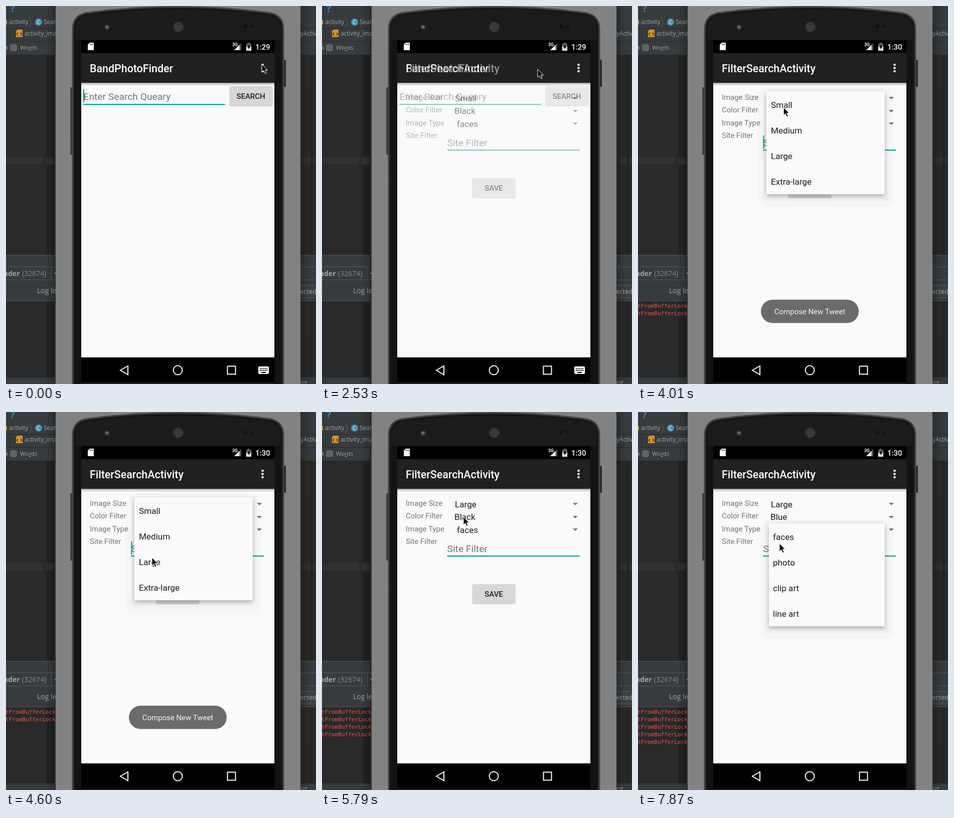
An HTML page that plays this animation: 618x753 px, repeating every 8 s.

```html
<!DOCTYPE html>
<html lang="en">
<head>
<meta charset="utf-8">
<title>Search filter demo</title>
<style>
  html, body { margin: 0; width: 100%; height: 100%; overflow: hidden; background: #2b2b2b; }
  svg { display: block; width: 618px; height: 753px; }
  text { font-family: Roboto, sans-serif; white-space: pre; }
  .ide text { font-family: "Open Sans", sans-serif; fill: #a3a5a6; font-size: 11.8px; }
  .ide .big { font-size: 14px; }
  .ide .log text { font: 11.05px "DejaVu Sans Mono", monospace; fill: #e5544f; }
  .title { font-size: 21.4px; font-weight: 500; fill: #fff; }
  .label { font-size: 14.97px; fill: #757575; }
  .hint { font-size: 19.24px; fill: #757575; }
  .item { font-size: 17.1px; fill: #1c1c1c; }
  .btn { font-size: 14.97px; font-weight: 500; fill: #1c1c1c; text-anchor: middle; }
  .raised { fill: #d6d7d7; filter: drop-shadow(0 1px 1px rgba(0,0,0,.3)); }
  .sheet { fill: #fafafa; filter: drop-shadow(0 4px 4px rgba(0,0,0,.27)); }
  .teal { fill: #009688; }
</style>
</head>
<body>
<svg viewBox="0 0 618 753">
  <defs>
    <linearGradient id="shade" x2="0" y2="1">
      <stop stop-opacity=".32"/><stop offset="1" stop-opacity="0"/>
    </linearGradient>
    <linearGradient id="edge">
      <stop stop-opacity="0"/><stop offset="1" stop-opacity=".25"/>
    </linearGradient>
    <linearGradient id="side">
      <stop stop-color="#4a4a4a"/><stop offset="1" stop-color="#222"/>
    </linearGradient>
    <pattern id="mesh" width="3" height="3" patternUnits="userSpaceOnUse">
      <rect width="3" height="3" fill="#1c1c1c"/><circle cx="1.5" cy="1.5" r="1" fill="#737373"/>
    </pattern>
    <pattern id="grain" width="4" height="4" patternUnits="userSpaceOnUse">
      <rect width="4" height="4" fill="#161616"/><path d="M0 0h2v2h-2zM2 2h2v2h-2z" fill="#101010"/>
    </pattern>
  </defs>

  <g class="ide">
    <rect width="618" height="753" fill="#2a2a2a"/>
    <rect width="618" height="97" fill="#383b3d"/>
    <path d="M0 44.5H618M0 70.5H618M0 97.5H618" stroke="#27292a"/>
    <path d="M80 98h16v399h-16zM80 588h16v152h-16zM606 98h6v399h-6zM606 588h6v152h-6z" fill="#232323"/>
    <path d="M0 301h74v15H0zM80 301h15v15H80zM590 301h17v15H590zM612 301h6v15H612z" fill="#323232"/>
    <path d="M97.5 98V497M97.5 588V740" stroke="#3b3d3e" stroke-width="2"/>
    <rect y="497" width="618" height="91" fill="#383b3d"/>
    <path d="M0 496.5H618M0 519.5H618M0 545.5H618M0 587.5H618M90.5 520V545" stroke="#56595a"/>
    <path d="M0 588.5H618" stroke="#222"/>
    <rect y="740" width="618" height="13" fill="#383b3d"/>
    <text x="9" y="12" style="font-size:18px;font-weight:700;fill:#3a8dbb">?</text>
    <rect y="28" width="2" height="9" fill="#c98a2c"/>
    <text x="6" y="36">activity</text>
    <path d="M46 22L51 32L46 43" fill="none" stroke="#5b5e60"/>
    <circle cx="65" cy="32" r="7" fill="#4b93b5"/>
    <text x="61.2" y="36" style="font-size:10.5px;fill:#e6eef2">C</text>
    <text x="75" y="36">SearchActivity</text>
    <path d="M7.5 45V70" stroke="#27292a"/>
    <path d="M23 47H33V62H20V50Z" fill="#d4932e"/>
    <path d="M24 53L21.5 56L24 59M29 53L31.5 56L29 59" fill="none" stroke="#3a2c12" stroke-width="1.3"/>
    <text x="37" y="59">activity_image</text>
    <text x="-2" y="87">x</text>
    <rect x="9" y="77" width="12" height="12" rx="2" fill="#5e6163" stroke="#77797a"/>
    <text x="28" y="87" style="font-size:11.5px">Wo<tspan text-decoration="underline">r</tspan>ds</text>
    <text class="big" x="27.5" y="538" text-anchor="end" font-weight="700">nder</text>
    <text class="big" x="32" y="538" style="fill:#858788">(32674)</text>
    <path d="M96 531h6l-3 4z" fill="#a3a5a6"/>
    <text class="big" x="62" y="572">Log level</text>
    <text x="587" y="59">yActivity</text>
    <rect x="570" y="556.500" width="60" height="25" fill="#3d4042" stroke="#5a5d5f"/>
    <text x="586" y="573" style="font-size:13px">ected</text>
    <text x="587" y="754">og</text>
    <g class="log" id="log"></g>
    <rect x="79" width="20" height="753" fill="url(#edge)"/>
    <rect x="-607" width="20" height="753" fill="url(#edge)" transform="scale(-1 1)"/>
  </g>

  <rect x="99" width="488" height="753" fill="#828282"/>
  <rect x="128" y="162" width="6" height="134" rx="1" fill="url(#side)"/>
  <rect x="552" y="107" width="6" height="54" rx="1" fill="#292929"/>
  <path d="M133 760V46Q133 20 158 14Q250 1.500 343 1.500T528 14Q553 20 553 46V760Z" fill="#1b1b1b" stroke="#444" stroke-width="3"/>
  <path d="M136.500 753V48Q137 24 160 18Q250 6 343 6T526 18Q549 24 549.500 48V753" fill="none" stroke="#101010"/>
  <path d="M138 68h12v685h-12zM535 68h13v685h-13z" fill="url(#grain)"/>
  <circle cx="201.500" cy="42" r="5.500" fill="#34343a"/>
  <circle cx="201.500" cy="42" r="3" fill="#55557c"/>
  <circle cx="200.500" cy="41" r="1" fill="#b0b0cc"/>
  <circle cx="343.500" cy="41.500" r="10" fill="url(#mesh)"/>
  <circle cx="477" cy="41" r="4" fill="#111"/><circle cx="490" cy="41" r="3" fill="#111"/>

  <path d="M150 68h385v682H150z"/>
  <path d="M167 73h8v15h-12v-11z" fill="#fff"/>
  <path d="M167.500 75v3M170 75v3M172.500 75v3" stroke="#000"/>
  <path d="M455 88L469 74V88Z" fill="#555"/>
  <path d="M455 88L465.500 77.500V88Z" fill="#fff"/>
  <text x="451" y="80" font-size="8.500" font-weight="700" fill="#fff">3G</text>
  <path d="M482 73h4v2h3v7h-10v-7h3z" fill="#606060"/>
  <path d="M479 81h10v8h-10z" fill="#fff"/>
  <path d="M485 76L481 83H483.500V87L487.500 80.500H485Z"/>
  <text id="clock" x="497" y="87" font-size="15" font-weight="500" fill="#fff"></text>
  <rect x="150" y="94" width="385" height="59" fill="#212121"/>
  <rect x="150" y="153" width="385" height="547" fill="#fafafa"/>
  <g fill="none" stroke="#fff" stroke-width="2">
    <path d="M228 725.500L243 717V734.500Z"/><circle cx="342.500" cy="725.500" r="9"/><path d="M441.500 717.500h16v16h-16z"/>
  </g>

  <g id="home">
    <text class="title" x="167" y="132">BandPhotoFinder</text>
    <text class="hint" x="154.500" y="186.500">Enter Search Queary</text>
    <rect class="teal" x="154" y="195" width="283" height="2"/>
    <rect class="raised" x="446" y="160" width="85" height="38" rx="2"/>
    <text class="btn" x="488" y="185">SEARCH</text>
    <rect x="503" y="718" width="21" height="15" rx="2" fill="#fff"/>
    <path d="M506 722.500H522M506 726H522" stroke="#000" stroke-width="2" stroke-dasharray="2 1.300"/>
    <path d="M509 730H518" stroke="#000" stroke-width="2"/>
  </g>

  <g id="filter">
    <rect x="150" y="94" width="385" height="59" fill="#212121"/>
    <rect x="150" y="153" width="385" height="547" fill="#fafafa"/>
    <text class="title" x="167" y="132">FilterSearchActivity</text>
    <text class="label" x="167" y="187">Image Size</text>
    <text class="label" x="167" y="212">Color Filter</text>
    <text class="label" x="167" y="238">Image Type</text>
    <text class="label" x="167" y="263">Site Filter</text>
    <text class="item" x="265" y="190" id="size"></text>
    <text class="item" x="264" y="215" id="color"></text>
    <text class="item" x="269" y="241">faces</text>
    <path d="M500 181h10l-5 5zM500 207h10l-5 5zM500 232h10l-5 5z" fill="#757575"/>
    <text class="hint" x="249.500" y="279">Site Filter</text>
    <rect class="teal" x="249.500" y="286" width="264.500" height="2"/>
    <rect class="raised" x="300" y="343" width="85" height="38" rx="2"/>
    <text class="btn" x="342.500" y="367.500">SAVE</text>
  </g>
  <rect id="caret" class="teal" width="2" height="26"/>

  <rect x="150" y="153" width="385" height="6" fill="url(#shade)"/>
  <g fill="#fff"><circle cx="511.500" cy="117" r="2.300"/><circle cx="511.500" cy="123.500" r="2.300"/><circle cx="511.500" cy="130" r="2.300"/></g>
  <g id="toast">
    <rect x="245" y="585" width="195" height="46.500" rx="23.250" fill="#6b6b6b"/>
    <text x="342.500" y="613.500" text-anchor="middle" font-size="14.970" fill="#f2f2f2">Compose New Tweet</text>
  </g>
  <g id="popups"></g>
  <path id="cursor" d="M0 0V16L3.700 12.600L6.500 18.700L9 17.500L6.400 11.600H11.300Z" stroke="#fff" stroke-linejoin="round"/>
</svg>
<script>
const el = id => document.getElementById(id);
const LOOP = 8000, RATE = 0.006745;

// x, y, width, text inset, items, first and last tick on screen
const popups = [
  [335, 99, 196, 17, ['Settings'], 12, 16],
  [256, 170, 236, 9, ['Small', 'Medium', 'Large', 'Extra-large'], 26, 31],
  [255, 196, 237, 9, ['Black', 'Blue', 'Brown', 'Grey', 'Green', 'Yellow'], 42, 47],
  [261, 222, 231, 8, ['faces', 'photo', 'clip art', 'line art'], 52, 54]
];
const ROW = 51.25;
el('popups').innerHTML = popups.map(([x, y, w, inset, items]) => {
  const h = items.length * ROW;
  const glow = [[17, 8, 25], [9, 4, 15]].map(([side, top, bottom]) =>
    `<rect x="${x - side}" y="${y - top}" width="${w + side * 2}" height="${h + top + bottom}" rx="${side}" fill-opacity=".014"/>`);
  const rows = items.map((s, i) =>
    `<text class="item" x="${x + inset}" y="${y + 32.5 + i * ROW}">${s}</text>`);
  return `<g>${items.length > 1 ? glow.join('') : ''}
    <rect class="sheet" x="${x}" y="${y}" width="${w}" height="${h}" rx="2"/>${rows.join('')}</g>`;
}).join('');

const logTicks = [18, 18, 32, 34, 52];
el('log').innerHTML = logTicks.map((_, i) =>
  `<text x="-1" y="${601 + i * 15}">tFromBufferLock</text>`).join('');

// tick, x, y
const path = [
  [1, 510, 116], [5, 520, 122], [9, 510, 124], [11, 510, 124], [15, 430, 126], [17, 430, 126],
  [20, 397, 129], [24, 290, 178], [26, 290, 180], [31, 291, 290], [32, 291, 290],
  [39, 282, 209], [41, 282, 209], [46, 285, 272], [47, 285, 272], [49, 283, 240],
  [51, 283, 238], [53, 282, 262]
];

function cursorAt(tick) {
  const i = path.findIndex(p => p[0] >= tick);
  if (i < 1) return path[i < 0 ? path.length - 1 : 0].slice(1);
  const [t0, x0, y0] = path[i - 1], [t1, x1, y1] = path[i];
  const k = (tick - t0) / (t1 - t0);
  return [x0 + (x1 - x0) * k, y0 + (y1 - y0) * k];
}

const clamp = v => Math.max(0, Math.min(1, v));
const fade = (id, v) => el(id).setAttribute('opacity', clamp(v));

function caretOn(t, tick) {
  if (tick >= 26 && tick < 32) return true;
  if (tick >= 42) return false;
  const start = tick >= 34 ? 5100 : tick >= 17 ? 2600 : 0;
  return (t - start + 1000) % 1000 < 480;
}

function draw(now) {
  const t = now % LOOP, tick = Math.floor(t * RATE);
  const onFilter = tick >= 17;
  fade('home', tick < 18);
  fade('filter', (tick - 16) / 2);
  fade('toast', Math.min((tick - 17) / 2, (37 - tick) / 2));
  fade('caret', caretOn(t, tick));
  el('caret').setAttribute('transform', onFilter ? 'translate(249.5 258)' : 'translate(154 166)');
  el('clock').textContent = tick < 22 ? '1:29' : '1:30';
  el('size').textContent = tick < 33 ? 'Small' : 'Large';
  el('color').textContent = tick < 48 ? 'Black' : 'Blue';
  popups.forEach((p, i) => {
    const [from, to] = p.slice(5);
    el('popups').children[i].setAttribute('opacity', tick > to ? 0 : clamp((tick - from + 1) / 2));
  });
  logTicks.forEach((from, i) => el('log').children[i].setAttribute('opacity', +(tick >= from)));
  el('cursor').setAttribute('transform', `translate(${cursorAt(tick)})`);
  requestAnimationFrame(draw);
}
requestAnimationFrame(draw);
</script>
</body>
</html>
```
